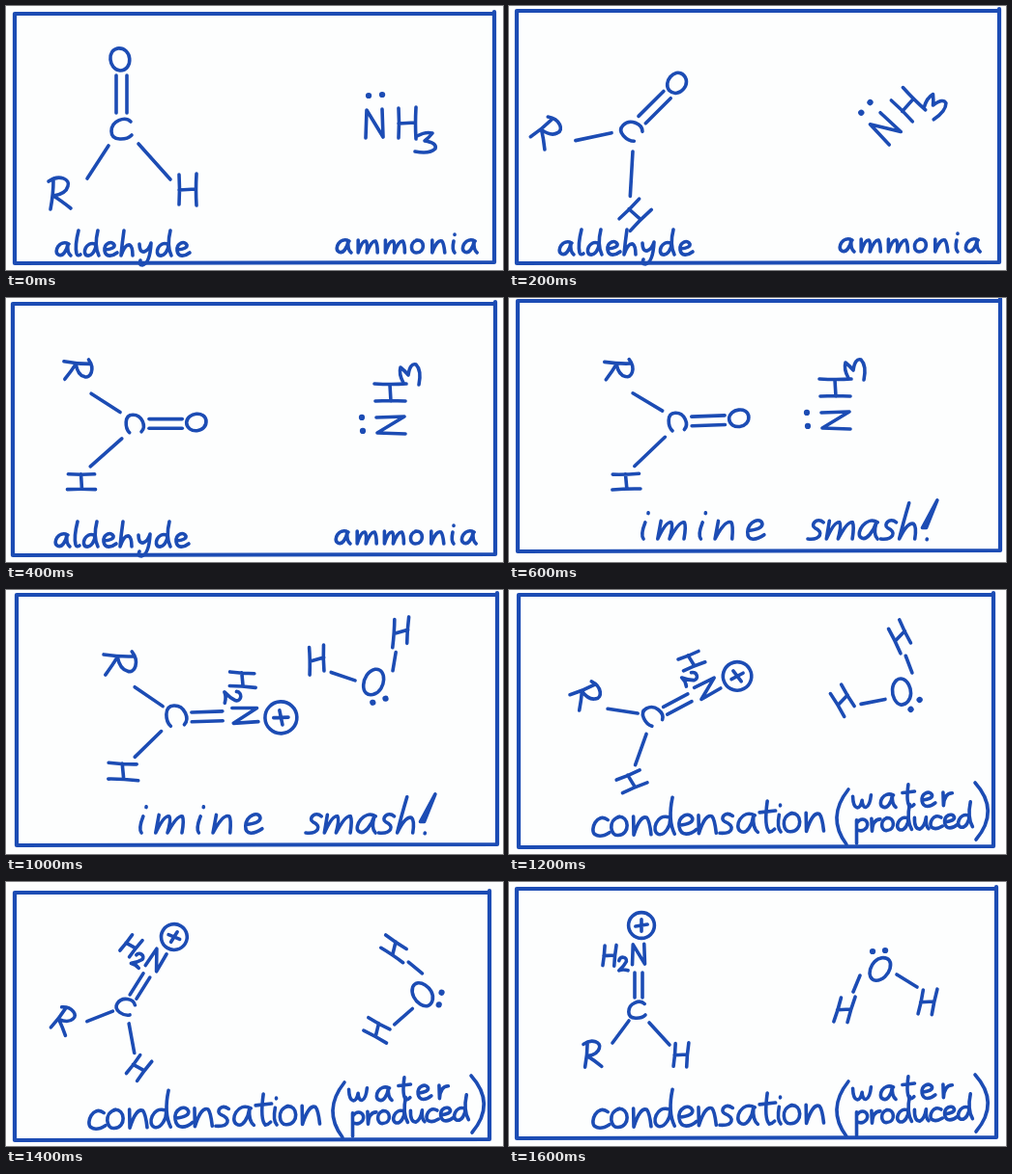
Animation, 514 px wide and 274 px high, one loop 1800 ms. Source, as an HTML page:

```html
<!DOCTYPE html>
<html lang="en">
<head>
<meta charset="utf-8">
<title>Imine smash</title>
<style>
  html, body { margin: 0; width: 100%; height: 100%; overflow: hidden; background: #fdfefe; }
  svg { display: block; width: 100vw; height: 100vh; }
  path { fill: none; stroke: #1c4cb4; stroke-width: 3.6; stroke-linecap: round;
         stroke-linejoin: round; vector-effect: non-scaling-stroke; }
  .border { stroke-width: 4.2; }
  .dot { stroke-width: 6.2; }
</style>
</head>
<body>
<svg id="stage" viewBox="0 0 514 274" preserveAspectRatio="none"></svg>
<script>
const NS = 'http://www.w3.org/2000/svg';
const stage = document.getElementById('stage');
const STEP = 200;

// Symbols, centred on 0,0
const SYMBOL = {
  R: 'M-6-14Q-6 0-9 16M-11-13C0-21 12-15 9-8Q7 0-6 2Q2 7 12 15',
  C: 'M10-8C4-14-10-9-10 2C-10 13 6 11 11 6',
  H: 'M-9-15Q-8 0-9 16M9-16Q8 2 9 17M-9 1L8 0',
  O: 'M-2-11C-14-10-12 11 0 12C14 12 13-13-3-11',
  N: 'M-9 15L-8-14L9 14L8-15',
  2: 'M-5-4C-4-10 5-9 4-3Q1 3-5 8Q0 6 6 8',
  3: 'M-9-7Q0-12 7-10Q3-5-1-2Q12 0 10 6Q4 12-11 9',
  '+': 'M-13 0a13 13 0 1 0 26 0a13 13 0 1 0-26 0M-6 1L6-1M0-6V6'
};

// Handwriting: width and pen stroke, standing on the baseline
const LETTER = {
  a: [15, 'M14-12C4-17-2-4 3-1C8 2 12-6 13-12Q12-3 16 0'],
  c: [12, 'M12-11C4-17-2-4 2-1Q6 2 13-2'],
  d: [15, 'M11-12C2-15-3-2 3 0C8 1 12-6 12-11M14-26Q10-10 15 0'],
  e: [12, 'M1-6Q12-7 11-11C9-16 0-13 1-5C2 2 9 1 14-3'],
  h: [14, 'M4-26Q2-12 1 0Q5-12 10-11Q13-9 13 0'],
  i: [3, 'M2-12Q0-3 3 0M3-19v.5'],
  l: [5, 'M4-26Q0-10 2-2Q3 1 6-1'],
  m: [21, 'M1-13L1 0Q5-13 9-12Q11-10 10 0Q15-13 19-12Q21-9 21 0'],
  n: [14, 'M1-13L1 0Q6-14 11-12Q13-10 14 0'],
  o: [13, 'M6-13C-3-11-1 1 5 0C14 0 14-14 5-13'],
  p: [13, 'M2-12L1 12M2-9C8-17 16-10 12-4Q8 1 2-2'],
  r: [10, 'M2-13L2 0Q3-12 11-12'],
  s: [10, 'M10-12C4-16 0-10 4-8C12-5 10 1 0 0'],
  t: [10, 'M6-22Q3-4 7 0Q9 0 11-2M0-14L12-15'],
  u: [14, 'M1-12Q0 0 6 0Q11-2 13-12Q12-3 15 0'],
  w: [18, 'M0-12C0 2 7 2 9-8C9 2 16 2 18-13'],
  y: [14, 'M1-12Q1-3 6-4Q11-6 13-13Q12 8 4 10Q0 10 2 5'],
  '!': [12, 'M0-8L8-28L3-8ZM5 0v.5']
};

function add(parent, tag, attrs = {}) {
  const el = document.createElementNS(NS, tag);
  for (const key in attrs) el.setAttribute(key, attrs[key]);
  return parent.appendChild(el);
}

function symbol(g, name, x, y, size = 1, slant = 0) {
  add(g, 'path', {
    d: SYMBOL[name],
    transform: `translate(${x} ${y}) scale(${size}) skewX(${-slant})`
  });
}

function bond(g, x1, y1, x2, y2) {
  add(g, 'path', { d: `M${x1} ${y1}L${x2} ${y2}` });
}

function dot(g, x, y) {
  add(g, 'path', { d: `M${x} ${y}h.1`, class: 'dot' });
}

function word(g, text, x, y, size, gap, { slant = 0, tall = 1, tilt = 0 } = {}) {
  const w = add(g, 'g', {
    role: 'img', 'aria-label': text,
    transform: `translate(${x} ${y}) rotate(${tilt}) scale(${size} ${size * tall})`
  });
  let pen = 0;
  for (const ch of text) {
    const [width, d] = LETTER[ch];
    add(w, 'path', { d, transform: `translate(${pen} 0) skewX(${-slant})` });
    pen += width + gap;
  }
}

const MOLECULE = {
  aldehyde(g) {
    symbol(g, 'C', 0, 0);
    symbol(g, 'O', -1, -73);
    bond(g, -5, -56, -5, -17);
    bond(g, 6, -56, 6, -17);
    bond(g, -13, 17, -35, 51);
    symbol(g, 'R', -64, 67);
    bond(g, 18, 15, 51, 52);
    symbol(g, 'H', 69, 62);
  },
  ammonia(g) {
    symbol(g, 'N', 0, 0);
    symbol(g, 'H', 34, -1);
    symbol(g, '3', 53, 20);
    dot(g, -6, -29);
    dot(g, 8, -30);
  },
  iminium(g) {
    symbol(g, 'C', 0, 0, .82);
    symbol(g, 'N', 2, -58, .72);
    bond(g, -2, -39, -2, -13);
    bond(g, 6, -39, 6, -13);
    symbol(g, 'H', -28, -57, .66, 6);
    symbol(g, '2', -14, -48, .85);
    symbol(g, '+', 5, -88, 1.03);
    bond(g, -8, 11, -25, 34);
    symbol(g, 'R', -46, 46, .82);
    bond(g, 13, 13, 34, 36);
    symbol(g, 'H', 46, 46, .76, 5);
  },
  water(g) {
    symbol(g, 'O', 0, 0, 1.02, 20);
    dot(g, -8, -18);
    dot(g, 5, -19);
    bond(g, -21, 7, -28, 24);
    symbol(g, 'H', -37, 42, .8, 17);
    bond(g, 17, 6, 38, 19);
    symbol(g, 'H', 49, 34, .8, 12);
  }
};

const CAPTION = {
  reactants(g) {
    word(g, 'aldehyde', 51, 259, 1, 5);
    word(g, 'ammonia', 341, 256, 1, 7.2);
  },
  smash(g) {
    word(g, 'imine', 135, 250, 1.36, 9.8, { slant: 11, tall: 1.05 });
    word(g, 'smash!', 309, 250, 1.34, 3.4, { slant: 10, tall: 1.07 });
  },
  products(g) {
    word(g, 'condensation', 86, 255, 1.38, 2.6, { tall: 1.06, tilt: -1.2 });
    add(g, 'path', { d: 'M351 207Q328 236 349 264' });
    word(g, 'water', 356, 227, 1.05, 8, { tilt: -2 });
    word(g, 'produced', 358, 251, 1, 2.5, { tilt: -2.5 });
    add(g, 'path', { d: 'M482 200Q508 229 483 259' });
  }
};

// border: left, top, right, bottom; caption: dx, dy; molecules: x, y, turn, size
const SCENES = [
  { border: [9, 8, 505, 267], caption: ['reactants', 0, 0],
    aldehyde: [119, 128, 0, 1], ammonia: [381, 122, 0, 1] },
  { border: [8, 5, 507, 267], caption: ['reactants', 0, -1],
    aldehyde: [126, 129, 45, .94], ammonia: [389, 127, -45, 1] },
  { border: [7, 6, 506, 267], caption: ['reactants', -1, -1],
    aldehyde: [133, 130, 90, .88], ammonia: [398, 132, -90, 1] },
  { border: [9, 3, 508, 263], caption: ['smash', 0, 0],
    aldehyde: [174, 128, 88, .88], ammonia: [338, 127, -90, 1] },
  { border: [6, 2, 507, 263], caption: ['smash', -1, 0],
    aldehyde: [196, 128, 88, .88], ammonia: [298, 127, -90, 1] },
  { border: [11, 5, 508, 265], caption: ['smash', 1, 2],
    iminium: [176, 130, 88, 1.23], water: [380, 96, 167, 1.06] },
  { border: [10, 5, 501, 267], caption: ['products', 0, 0],
    iminium: [148, 130, 62, 1.1], water: [406, 106, 137, 1.03] },
  { border: [9, 11, 500, 268], caption: ['products', -1, 1],
    iminium: [123, 129, 32, 1], water: [431, 117, 107, 1] },
  { border: [8, 7, 504, 266], caption: ['products', 0, 0],
    iminium: [132, 133, 0, 1], water: [384, 90, 0, 1] }
];

SCENES.forEach(({ border: [l, t, r, b], caption: [text, dx, dy], ...parts }, i) => {
  const scene = add(stage, 'g');
  add(scene, 'path', {
    class: 'border',
    d: `M${r} ${t}L${l} ${t}V${b}L${r} ${b - 1}V${t - 2}`
  });
  CAPTION[text](add(scene, 'g', { transform: `translate(${dx} ${dy})` }));
  for (const name in parts) {
    const [x, y, turn, size] = parts[name];
    MOLECULE[name](add(scene, 'g', {
      transform: `translate(${x} ${y}) rotate(${turn}) scale(${size})`
    }));
  }
  const count = SCENES.length;
  const frames = Array.from({ length: count + 1 }, (_, k) => ({
    opacity: k === i ? 1 : 0, offset: k / count, easing: 'steps(1, end)'
  }));
  scene.animate(frames, { duration: count * STEP, iterations: Infinity });
});
</script>
</body>
</html>
```
